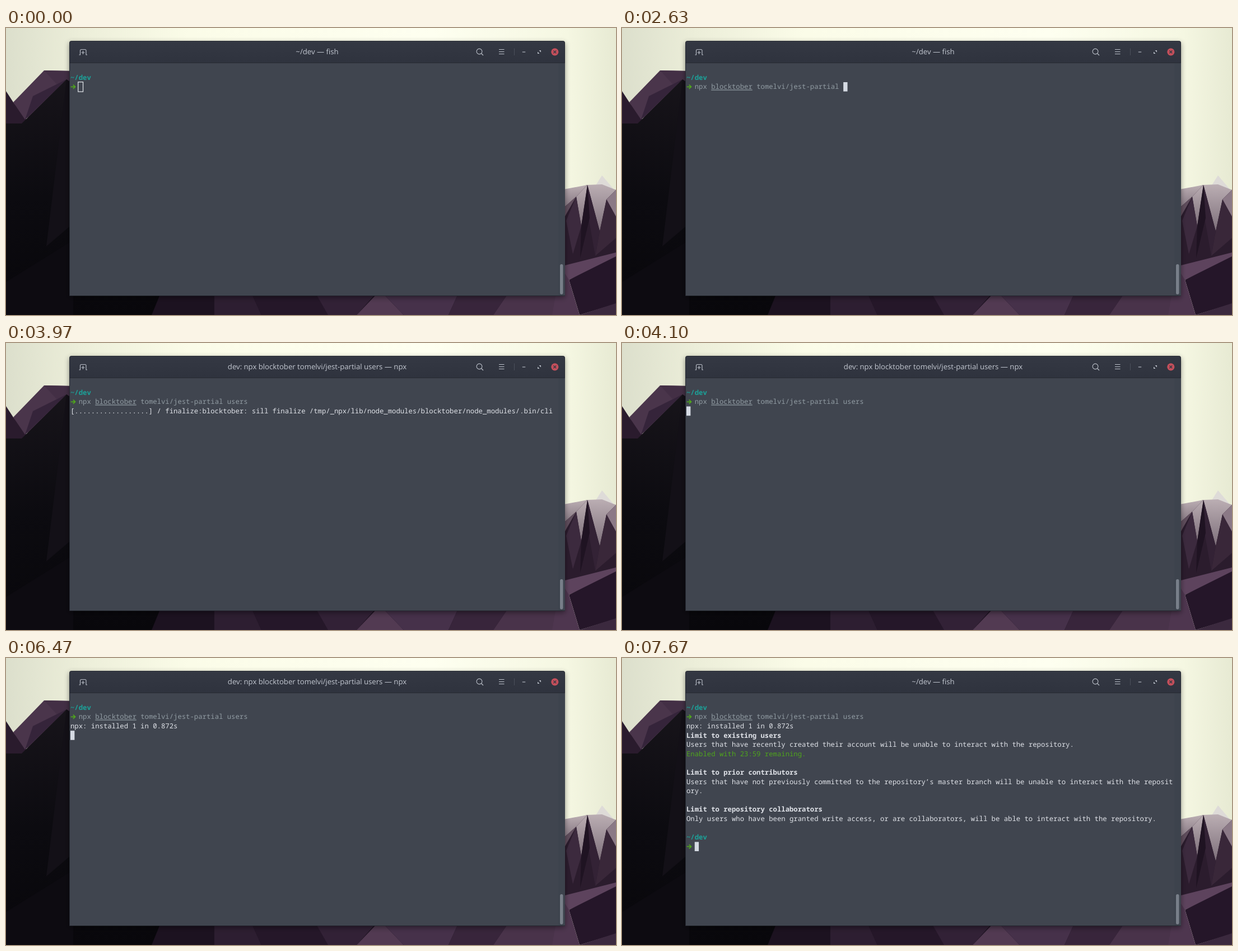
Animation of 1089 by 514 pixels, one loop 8 s. Source, as an HTML page:

```html
<!DOCTYPE html>
<html lang="en">
<head>
<meta charset="utf-8">
<title>Terminal</title>
<style>
  html, body { margin: 0; width: 100%; height: 100%; overflow: hidden; background: #0b0a0e; }
  svg { display: block; width: 100%; height: 100%; }
  text { white-space: pre; text-rendering: geometricPrecision; }
  #title { font: 13.16px "Open Sans", "Noto Sans", sans-serif; fill: #c2c7d0; text-anchor: middle; }
  #screen { font: 12.288px "Noto Sans Mono", "DejaVu Sans Mono", monospace; fill: #dfe2e8; }
  .bold { font-weight: 700; }
  .dir { font-weight: 700; fill: #1ba39a; }
  .ok { fill: #4fa51c; }
  .typed { fill: #919ca3; }
  .hint { fill: #66747d; }
  .path { text-decoration: underline; }
  .arrow { fill: none; stroke: #4fa51c; stroke-width: 1.7; }
  .block { fill: #d5dae3; }
  .under { fill: #40454f; }
  .hollow { fill: none; stroke: #e6e9ee; stroke-width: 1.2; }
  .icon { fill: none; stroke: #bcc1ca; stroke-width: 1.1; }
</style>
</head>
<body>
<svg viewBox="0 0 1089 514" preserveAspectRatio="none">
  <defs>
    <linearGradient id="sky">
      <stop offset="0" stop-color="#dcdfcc"/>
      <stop offset=".12" stop-color="#eceed9"/>
      <stop offset=".3" stop-color="#fbfce8"/>
      <stop offset=".7" stop-color="#fefff0"/>
      <stop offset=".92" stop-color="#f5f7e2"/>
      <stop offset="1" stop-color="#e7ead3"/>
    </linearGradient>
    <linearGradient id="rock" x2="0" y2="1">
      <stop offset="0" stop-color="#17141a"/>
      <stop offset=".5" stop-color="#0c0b10"/>
      <stop offset="1" stop-color="#08070b"/>
    </linearGradient>
    <linearGradient id="snow" x2="0" y2="1">
      <stop offset="0" stop-color="#bbaeb3"/>
      <stop offset="1" stop-color="#7d6f7a"/>
    </linearGradient>
    <linearGradient id="bar" x2="0" y2="1">
      <stop offset="0" stop-color="#343843"/>
      <stop offset="1" stop-color="#2f333e"/>
    </linearGradient>
    <filter id="shadow" x="-5%" y="-5%" width="110%" height="112%">
      <feDropShadow dx="0" dy="3" stdDeviation="5" flood-opacity=".42"/>
    </filter>
  </defs>

  <rect width="1089" height="514" fill="url(#sky)"/>

  <!-- left mountain -->
  <path fill="#2a1b2d" d="M0 113L13 133 36 160V175H0z"/>
  <path fill="#4a354b" d="M13 133L68 76 120 77V100L34 164z"/>
  <path fill="#432f45" d="M68 76L120 77V95L90 100z"/>
  <path fill="#35243a" d="M34 164L48 122 108 92z"/>
  <path fill="url(#rock)" d="M0 171H28L108 92 130 110V470H290V514H0z"/>
  <path fill="#131017" d="M108 92L120 100V350L72 391z"/>
  <path fill="#0d0b11" d="M0 455L120 380V514H0z"/>

  <!-- foreground ridge -->
  <path fill="#1c1220" d="M278 470H1000V514H260z"/>
  <path fill="#2d1e31" d="M372 470H436L456 514H372z"/>
  <path fill="#251729" d="M436 470H570L600 514H456z"/>
  <path fill="#322136" d="M550 470H665L626 514H575z"/>
  <path fill="#523a52" d="M668 470L710 514H626z"/>
  <path fill="#46314a" d="M668 470H810L790 514H710z"/>
  <path fill="#38253b" d="M810 470H900L870 514H790z"/>
  <path fill="#49334a" d="M900 470H1000V514H870z"/>

  <!-- right mountains: dark peaks with pale wedges hanging between them -->
  <path fill="#2b1c2d" d="M990 295L1038 281 1089 290V430H990z"/>
  <path fill="#dedbd8" d="M1064 264L1086 290 1068 300 1052 283z"/>
  <path fill="url(#snow)" d="M990 290L1038 281 1018 302 990 327z"/>
  <path fill="url(#snow)" d="M1038 281L1027 355 1018 302z"/>
  <path fill="url(#snow)" d="M1038 281L1064 280 1089 290 1072 307 1060 364z"/>
  <path fill="#8b7986" d="M1072 307L1089 290V338z"/>
  <path fill="#5f4d5c" d="M990 327L1018 302 1002 330 990 352z"/>
  <path fill="#3c2a3e" d="M1018 302L1027 355 1012 405 1000 345z"/>
  <path fill="#332235" d="M1038 281L1060 364 1052 408 1040 340z"/>
  <path fill="#392739" d="M1072 307L1089 338V376L1052 408 1060 364z"/>
  <path fill="#1f1322" d="M1038 281L1042 340 1025 412 1027 355z"/>
  <path fill="#5d435d" d="M990 427L1089 402V412L1005 451 990 480z"/>
  <path fill="#251629" d="M1005 451L1089 409V494L1024 514z"/>
  <path fill="#4e364f" d="M990 427L1005 451 1024 514H975z"/>
  <path fill="#3b293e" d="M1024 514L1089 493V514z"/>

  <!-- window -->
  <path fill="#262a32" filter="url(#shadow)" d="M113 480V27q0-4 4-4H994q4 0 4 4V480z"/>
  <path fill="url(#bar)" d="M114 62V27q0-3 3-3H994q3 0 3 3V62z"/>
  <path fill="#40454f" d="M114 63H998V479H114z"/>
  <path fill="#3d434d" d="M986 63H998V479H986z"/>
  <rect x="989" y="423" width="5.5" height="54" rx="2.7" fill="#787f89"/>

  <!-- header buttons -->
  <path class="icon" d="M130.5 48H132.5V40.5q0-2 2-2H141q2 0 2 2V48H145M137.5 41V47M134.5 44H140.5"/>
  <circle class="icon" cx="845" cy="42" r="4.9"/>
  <path class="icon" d="M848.5 45.5L852 49M880 38.5H889.5M880 42.5H889.5M880 46.5H889.5"/>
  <path stroke="#4b505b" d="M907.5 36.5V49"/>
  <path class="icon" stroke-width="1.6" d="M921.8 43H927.2"/>
  <path fill="#bcc1ca" d="M951.5 40H955V43.5zM949 42.5V46H952.5z"/>
  <circle cx="979.8" cy="42.8" r="6.6" fill="#c44f5b"/>
  <path stroke="#353a45" stroke-width="1.4" d="M977.4 40.4L982.2 45.2M982.2 40.4L977.4 45.2"/>

  <text id="title" x="555.5" y="47.3"></text>
  <g id="screen"></g>
</svg>

<script>
const LOOP = 8000, LEFT = 115, TOP = 80.4, CELL = 7.373, LINE = 16.6, BASELINE = 12.4;
const HOME = '~/dev — fish';
const base = 'npx blocktober tomelvi/jest-partial ';
const users = base + 'users';
const output = [
  ['', 'npx: installed 1 in 0.872s'],
  ['bold', 'Limit to existing users'],
  ['', 'Users that have recently created their account will be unable to interact with the repository.'],
  ['ok', 'Enabled with 23:59 remaining.'],
  ['', ''],
  ['bold', 'Limit to prior contributors'],
  ['', 'Users that have not previously committed to the repository’s master branch will be unable to interact with the reposit'],
  ['', 'ory.'],
  ['', ''],
  ['bold', 'Limit to repository collaborators'],
  ['', 'Only users who have been granted write access, or are collaborators, will be able to interact with the repository.'],
];

const type = (line, typed = line.length) => ({ line, typed, row: 1, col: 2 + typed, cursor: 'on' });
const on = { cursor: 'on' }, off = { cursor: 'off' };
const gauge = (done, spin) => ({
  cursor: 'off',
  gauge: `[${'#'.repeat(done).padEnd(18, '.')}] ${spin} finalize:blocktober: sill finalize /tmp/_npx/lib/node_modules/blocktober/node_modules/.bin/cli`,
});

// Each step changes part of the state left by the step before it.
const steps = [
  [0, { ...type(''), title: HOME, out: 0, gauge: '', prompt: false, cursor: 'hollow' }],
  [100, on],
  [470, type(base + 'cle', 1)],
  [1000, type(base + 'cle', 3)],
  [1500, type(base + 'cle')],
  [1630, type(base + 'cl')],
  [1800, type(base + 'c')],
  [2000, type(base)],
  [2400, off],
  [2630, on],
  [2770, type(users, base.length + 2)],
  [2800, type(users, base.length + 3)],
  [2970, type(users, base.length + 4)],
  [3000, type(users)],
  [3170, { row: 2, col: 0 }],
  [3200, { title: `dev: ${users} — npx` }],
  [3770, off],
  [3970, gauge(0, '/')],
  [4030, gauge(15, '-')],
  [4100, { gauge: '', cursor: 'on' }],
  [4500, { out: 1, row: 3 }],
  [4670, off],
  [5270, on],
  [5870, off],
  [6470, on],
  [6830, { out: output.length, row: 13 }],
  [6900, { title: HOME }],
  [6970, { prompt: true, row: 15, col: 2 }],
  [7070, off],
  [7670, on],
];
let last = {};
const states = steps.map(([time, change]) => last = { ...last, ...change, time });

const rowTop = row => TOP + row * LINE;
const text = (row, col, style, content) =>
  `<text x="${LEFT + col * CELL}" y="${rowTop(row) + BASELINE}" class="${style}">${content}</text>`;
const prompt = row => text(row, 0, 'dir', '~/dev') +
  `<path class="arrow" d="M115.8 ${rowTop(row + 1) + 8.3}h7.6m-3.6-3.6l3.8 3.6-3.8 3.6"/>`;

function cursor({ cursor, row, col, line, typed }) {
  const x = LEFT + col * CELL, y = rowTop(row);
  if (cursor === 'off') return '';
  if (cursor === 'hollow') return `<rect class="hollow" x="${x - 1}" y="${y - .3}" width="8.8" height="17.4"/>`;
  return `<rect class="block" x="${x}" y="${y}" width="${CELL}" height="${LINE}"/>` +
    (row === 1 ? text(row, col, 'under', line[typed] || '') : '');
}

function render(state) {
  const { line, typed } = state;
  const entered = line.slice(0, typed).replace(/blocktober|(?<= )cl?e?$/g, '<tspan class="path">$&</tspan>');
  document.getElementById('title').textContent = state.title;
  document.getElementById('screen').innerHTML =
    prompt(0) +
    text(1, 2, 'typed', entered) +
    text(1, 2 + typed, 'hint', line.slice(typed)) +
    text(2, 0, '', state.gauge) +
    output.slice(0, state.out).map(([style, content], i) => text(2 + i, 0, style, content)).join('') +
    (state.prompt ? prompt(14) : '') +
    cursor(state);
}

let shown;
function tick() {
  const time = performance.now() % LOOP;
  const state = states.findLast(s => s.time <= time);
  if (state !== shown) render(shown = state);
  requestAnimationFrame(tick);
}
tick();
</script>
</body>
</html>
```
